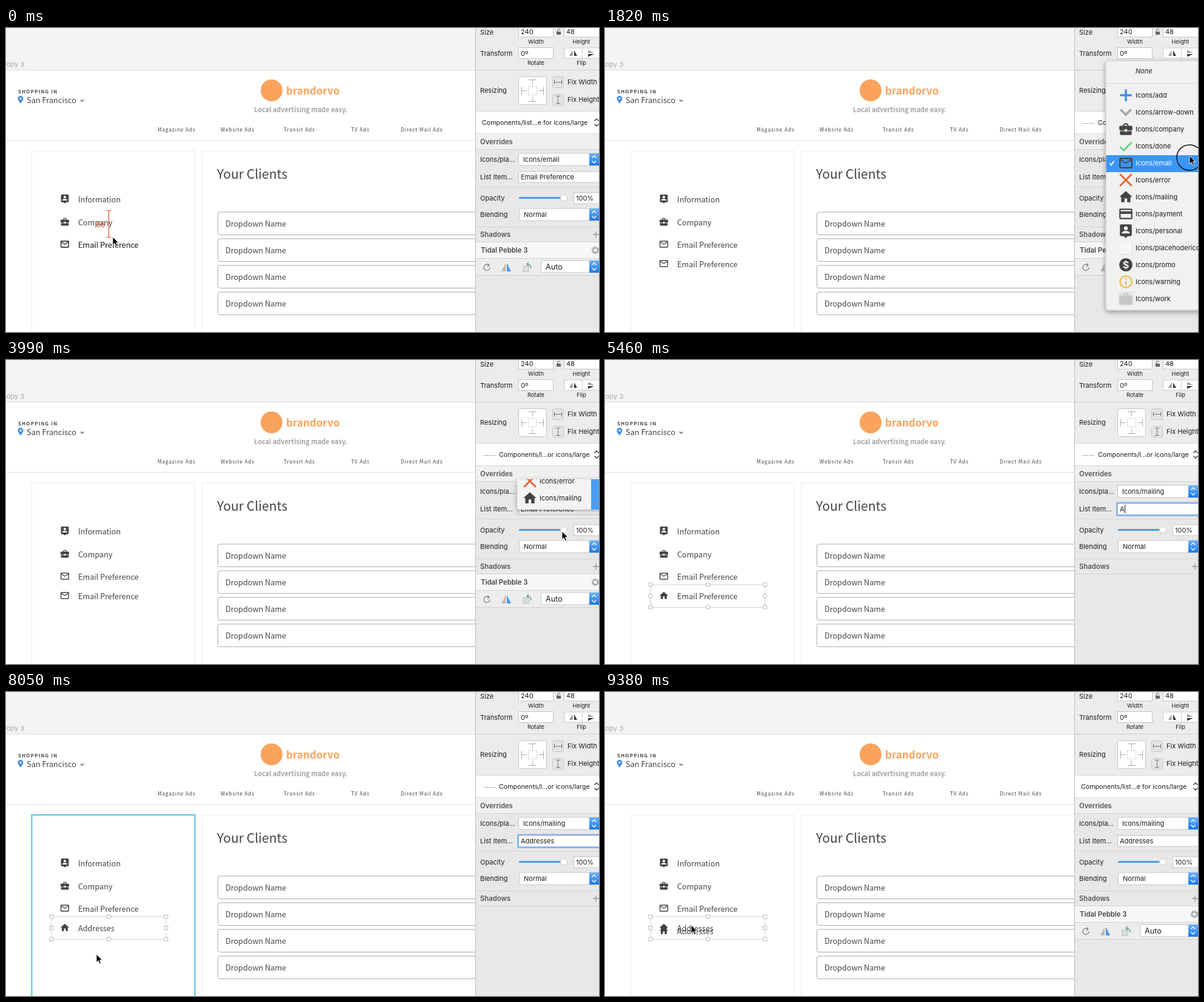
These frames come from a looping animation (978x502 px, 9450 ms). An HTML page:

```html
<!DOCTYPE html>
<html lang="en">
<head>
<meta charset="utf-8">
<title>Swapping a list icon</title>
<style>
html, body { margin: 0; width: 100%; height: 100%; overflow: hidden; background: #fff }
svg { display: block; width: 978px; height: 502px }
text { font-family: Inter, Roboto, sans-serif; font-size: 11px; fill: #1c1c1c; white-space: pre }
.web text, .web { font-family: 'Noto Sans CJK JP', 'Noto Sans CJK SC', 'Noto Sans CJK', 'Noto Sans', sans-serif; font-size: 12.65px; fill: #444 }
.web .nav { font-size: 8.3px; font-weight: 500; letter-spacing: .85px }
.head { font-weight: 600; fill: #555; font-size: 11.3px }
.small { font-size: 9.3px; text-anchor: middle }
</style>
</head>
<body>
<svg id="stage" viewBox="0 0 978 502"></svg>
<script>
const LOOP = 9450, STEP = 70, INK = '#444';
const $ = id => document.getElementById(id);
const text = (x, y, s, attrs = '') => `<text x="${x}" y="${y}" ${attrs}>${s}</text>`;
const rect = (x, y, w, h, fill, attrs = '') =>
  `<rect x="${x}" y="${y}" width="${w}" height="${h}" fill="${fill}" ${attrs}/>`;
const line = (d, color, w = 1, attrs = '') =>
  `<path d="${d}" fill="none" stroke="${color}" stroke-width="${w}" ${attrs}/>`;
const solid = (d, color = INK) => `<path d="${d}" fill="${color}" fill-rule="evenodd"/>`;

// Icons on a 24 unit grid
const card = 'M20 4H4a2 2 0 0 0-2 2v12a2 2 0 0 0 2 2h16a2 2 0 0 0 2-2V6a2 2 0 0 0-2-2z';
const bag = 'M20 7h-4V5l-2-2h-4L8 5v2H4a2 2 0 0 0-2 2v3a2 2 0 0 0 2 2h6v-2h4v2h6a2 2 0 0 0 2-2V9a2 2 0 0 0-2-2zM14 7h-4V5h4z';
const icons = {
  add: line('M12 3V21M3 12H21', '#3f8ee8', 3.2),
  'arrow-down': line('M4 8L12 16L20 8', '#a9a9a9', 3.6),
  company: solid(bag + 'M10 16v-1H3v4a2 2 0 0 0 2 2h14a2 2 0 0 0 2-2v-4h-7v1z'),
  done: line('M3 13L9 18.5L21 6', '#6dcf8d', 2.8),
  email: solid(card + 'M20 18H4V8l8 5 8-5zM12 11L4 6h16z'),
  error: line('M3 3L21 21M21 3L3 21', '#e2673a', 2.8),
  mailing: solid('M10 20v-6h4v6h5v-8h3L12 3 2 12h3v8z'),
  payment: solid(card + 'M20 18H4v-6h16zM20 8H4V6h16z'),
  personal: solid('M19 2H5a2 2 0 0 0-2 2v14a2 2 0 0 0 2 2h4l3 3 3-3h4a2 2 0 0 0 2-2V4a2 2 0 0 0-2-2zM12 5a3 3 0 1 1 0 6 3 3 0 0 1 0-6zM18 16H6v-1c0-2 4-3 6-3s6 1 6 3z'),
  placehodericon: rect(2, 2, 20, 20, '#f6f6f6') + line('M22 2V22H2', '#ddd'),
  promo: `<circle cx="12" cy="12" r="10" fill="${INK}"/>` +
    text(12, 17.5, '$', 'text-anchor="middle" style="font-size:15px;font-weight:600;fill:#fff"'),
  warning: `<circle cx="12" cy="12" r="8.8" fill="none" stroke="#e9c14f" stroke-width="2.2"/>` +
    line('M12 6.5V9M12 11V17', '#e9c14f', 2.2),
  work: rect(1, 1, 22, 22, '#e6e6e6') + solid('M20 7h-4V5l-2-2h-4L8 5v2H4a2 2 0 0 0-2 2v10a2 2 0 0 0 2 2h16a2 2 0 0 0 2-2V9a2 2 0 0 0-2-2zM14 7h-4V5h4z', '#c8c8c8')
};
const names = Object.keys(icons);
const icon = (name, cx, cy, size) =>
  `<g transform="translate(${cx - size / 2} ${cy - size / 2}) scale(${size / 24})">${icons[name]}</g>`;
const item = (name, label, y) => icon(name, 97, y - 1, 17) + text(119, y + 4.5, label);

const chevrons = (x, y, color) =>
  line(`M${x - 3.5} ${y - 2.5}l3.5 -3.5l3.5 3.5M${x - 3.5} ${y + 2.5}l3.5 3.5l3.5 -3.5`, color, 1.4);
const select = (x, y, label, id, size = 11) =>
  rect(x, y - 10, 140, 20, '#fff', 'rx="3" stroke="#c6c6c6"') +
  rect(962, y - 10, 20, 20, 'url(#blue)') + chevrons(970, y, '#fff') +
  text(x + 7.5, y + size * .36, label, `id="${id}" style="font-size:${size}px"`);
const field = (x, y, w, label) =>
  rect(x, y - 9, w, 18, '#fff', 'stroke="#c4c4c4"') + text(x + 3.5, y + 4, label);

const page = () => {
  const nav = [[250, 'Magazine Ads'], [354, 'Website Ads'], [458, 'Transit Ads'], [569, 'TV Ads'], [651, 'Direct Mail Ads']];
  const drops = [304, 348, 392, 436];
  return rect(0, 0, 978, 502, '#fff') + rect(0, 0, 978, 69.5, '#f4f4f4') +
    line('M0 69.5H775', '#dcdcdc') + line('M0 185.5H775', '#e2e2e2') +
    text(1, 63.5, 'opy 3', 'style="fill:#aaa"') +
    '<circle cx="438" cy="103" r="18" fill="#f9a35c"/><g class="web">' +
    text(462, 109.5, 'brandorvo', 'style="font-size:17px;font-weight:700;fill:#f9a35c"') +
    text(409, 138.5, 'Local advertising made easy.', 'style="font-size:10.900px;font-weight:700;fill:#a3a3a3"') +
    text(20, 107.5, 'SHOPPING IN', 'style="font-size:8px;font-weight:700;letter-spacing:1.15px"') +
    solid('M24 125C21 120 19.500 118.500 19.500 116.500a4.500 4.500 0 0 1 9 0C28.500 118.500 27 120 24 125zM24 114.800a1.700 1.700 0 1 0 .01 0z', '#3f8ee8') +
    text(34, 124, 'San Francisco', 'style="font-size:12.8px"') + line('M123 118.500l2.700 2.700l2.700 -2.700', '#555', 1.2) +
    nav.map(([x, s]) => text(x, 171, s, 'class="nav"')).join('') +
    rect(42.5, 203, 269, 320, 'none', 'stroke="#ececec"') + rect(323.5, 203, 500, 320, 'none', 'stroke="#ececec"') +
    text(348, 249, 'Your Clients', 'style="font-size:21.100px"') +
    drops.map(y => rect(349.5, y, 440, 37.5, '#fff', 'rx="3" stroke="#aaa"') + text(362, y + 23.5, 'Dropdown Name')).join('') +
    item('personal', 'Information', 283) + item('company', 'Company', 321) + item('email', 'Email Preference', 358) +
    `<g id="copy"><g id="mail">${icon('email', 97, 357, 17)}</g><g id="home">${icon('mailing', 97, 357, 17)}</g>` +
    text(119, 362.5, '', 'id="copyText"') + '</g>' +
    `<g id="next">${item('mailing', 'Addresses', 390)}</g></g>` +
    `<g id="hover">${rect(42.5, 203, 269, 320, 'none', 'stroke="#4fc3e0" stroke-width="2"')}</g>` +
    '<g id="box">' + rect(75.5, 371, 188.5, 37.5, 'none', 'stroke="#d4d4d4"') +
    [371, 389.5, 408].flatMap(y => [75, 169.5, 264].map(x => x === 169.5 && y === 389.5 ? '' :
      rect(x - 3, y - 3, 6, 6, '#fff', 'stroke="#b5b5b5" rx="1"'))).join('') + '</g>' +
    '<g id="gap">' + line('M169.500 301.500V345.500M165.500 301.500H173.500M165.500 345.500H173.500', '#d2512f', 1.2) +
    text(149, 328.5, '56', 'style="font-size:12px;fill:#d2512f"') + '</g>';
};

const inspector = () =>
  rect(775, 0, 203, 502, '#e8e8e8') + rect(775, 0, 203, 138, '#ececec') + line('M775 69.500H978', '#d2d2d2') +
  rect(775, 138, 203, 36, '#fff') + rect(775, 175, 203, 25, '#f0f0f0') +
  line('M775 137.500H978M775 174.500H978M775 200.500H978M775 262.500H978M775 328.500H978M775 353.500H978', '#d6d6d6') +
  text(782, 11, 'Size') + field(845.5, 6, 57, '240') + field(920.5, 6, 70, '48') +
  rect(908, 6, 7, 5, '#666') + line('M909.500 6V4a2 2 0 0 1 4 0', '#666') +
  text(874, 26, 'Width', 'class="small"') + text(949, 26, 'Height', 'class="small"') +
  text(782, 46, 'Transform') + field(845.5, 41.5, 57, '0º') +
  rect(920.5, 33, 70, 17, '#fff', 'rx="3" stroke="#c8c8c8"') + line('M950.500 33V50', '#d0d0d0') +
  solid('M934.500 37V46H929zM960 41L970 41L960 36.500z', '#999') + solid('M937 37V46H942zM960 43H970L960 47.500z', '#333') +
  text(874, 61, 'Rotate', 'class="small"') + text(949, 61, 'Flip', 'class="small"') +
  text(782, 107, 'Resizing') + rect(845.5, 80.5, 46, 46, '#fff', 'rx="3" stroke="#c4c4c4"') +
  rect(861.5, 96.5, 14, 14, '#fff', 'stroke="#ccc" stroke-dasharray="2 1"') +
  line('M862 85.500h13M868.500 86v7M862 121.500h13M868.500 114v7M850.500 97v13M851 103.500h7M886.500 97v13M879 103.500h7', '#aaa') +
  [80.5, 109.5].map(y => rect(901.5, y, 18, 18, '#e4e4e4', 'rx="2" stroke="#c8c8c8"')).join('') +
  line('M904.500 86v7M916.500 86v7M905 89.500h11M907 112.500h7M907 124.500h7M910.500 113v11', '#777') +
  text(926, 93, 'Fix Width') + text(926, 122, 'Fix Height') +
  `<g id="thumb">${line('M787 157.500h20', '#aaa', 1.2, 'stroke-dasharray="3 1 6 1"')}</g>` +
  text(785, 160, '', 'id="symbol" style="font-size:10.700px"') + chevrons(974, 156, '#333') +
  text(782, 192, 'Overrides', 'class="head"') +
  text(782, 221, 'Icons/pla...') + select(845.5, 217, '', 'chosen') +
  text(782, 250, 'List Item...') + rect(845.5, 237, 140, 18, '#fff', 'stroke="#c4c4c4"') +
  rect(844.5, 236, 142, 20.5, '#fff', 'id="focus" rx="1.500" stroke="#8ab6ec" stroke-width="3"') +
  rect(849, 239, 89, 14, '#b4d5fe', 'id="mark"') + text(849, 250, '', 'id="typed"') + rect(0, 239, 1, 14, '#111', 'id="caret"') +
  text(782, 285, 'Opacity') + line('M847.500 280.500H916', '#4a9be8', 3, 'stroke-linecap="round"') +
  '<circle cx="920" cy="280.500" r="5.500" fill="#fff" stroke="#c6c6c6"/>' + field(936.5, 281, 60, '100%') +
  text(782, 312, 'Blending') + select(846.5, 308, 'Normal', 'blend') +
  text(782, 345, 'Shadows', 'class="head"') + line('M968 341H978M973 336V346', '#999', 1.4) +
  '<g id="plugin">' + rect(775, 354, 203, 26, '#f7f7f7') + rect(775, 381, 203, 27, '#ededed') + line('M775 380.500H978M775 408.500H978', '#d2d2d2') +
  text(783, 371, 'Tidal Pebble 3', 'class="head" style="fill:#444"') +
  '<circle cx="972" cy="367" r="4" fill="none" stroke="#aaa" stroke-width="2.500"/><circle cx="972" cy="367" r="5.800" fill="none" stroke="#aaa" stroke-width="1.500" stroke-dasharray="2 2.550"/>' +
  line('M796 391.500a5 5 0 1 0 2 4M794 389l3 2.500l-3 2.500', '#777', 1.2) +
  solid('M824 388V402H817z', '#bbb') + solid('M826 388V402H833z', '#4a9be8') +
  rect(853, 393, 9, 9, '#ddd', 'stroke="#bbb"') + line('M866 397C866 391 863 390 859 390M862 387l-3 3l3 3', '#5f9f80', 1.4) +
  select(882.5, 394, 'Auto', 'auto', 12.6) + '</g>' + line('M774.500 0V502', '#bcbcbc');

const rows = (dx, dy, id) => names.map((name, i) => {
  const y = 111 + 28 * i + dy;
  return icon(name, 859 + dx, y, 26) + text(875 + dx, y + 4, 'Icons/' + name, id ? `id="${id + i}"` : '');
}).join('');

const menu = () =>
  '<g id="menu">' + rect(826, 54, 170, 412, '#f1f1f1', 'rx="5" stroke="#c8c8c8" filter="url(#shade)"') +
  text(875, 75, 'None', 'font-style="italic"') + line('M826 91.500H978', '#dadada') +
  rect(826.5, 0, 152, 28, '#3b96f7', 'id="bar"') + rows(0, 0, 'row') +
  line('M832.500 223l2.500 3.500l4.500 -7', '#222', 1.8, 'id="tick"') + '</g>' +
  '<g id="shrunk">' + rect(843, 197, 160, 50, '#f3f3f3', 'rx="4" filter="url(#shade)"') +
  `<g clip-path="url(#slot)">${rows(5, -51)}${rect(965, 190, 14, 60, '#4b9cf5')}</g></g>`;

$('stage').innerHTML = `<defs>
  <linearGradient id="blue" x2="0" y2="1"><stop stop-color="#6cb5fb"/><stop offset="1" stop-color="#1778f2"/></linearGradient>
  <filter id="shade" x="-20%" y="-20%" width="140%" height="140%"><feDropShadow dx="0" dy="3" stdDeviation="4" flood-opacity=".35"/></filter>
  <clipPath id="slot"><rect x="843" y="197" width="160" height="50" rx="4"/></clipPath></defs>` +
  page() + inspector() + menu() +
  '<circle id="ring" cx="964" cy="214" r="21" fill="none" stroke="#111" stroke-width="1.500"/>' +
  '<path id="cursor" d="M0 0V13.500L3.200 10.600L5.400 15.600L7.700 14.600L5.500 9.700H9.800z" fill="#000" stroke="#fff" stroke-width=".9"/>';

// Pointer path: time, x, y
const path = [[0, 176, 345], [490, 176, 377], [630, 176, 377], [1400, 964, 211], [2030, 964, 211], [2660, 918, 278],
  [3640, 918, 278], [3920, 917, 283], [4060, 917, 283], [4550, 862, 240], [7070, 862, 240], [7840, 149, 433],
  [8120, 149, 433], [8680, 142, 380], [9100, 142, 380], [9380, 142, 385]];
const ease = p => p * p * (3 - 2 * p);
function pointer(t) {
  const i = path.findIndex(k => k[0] > t);
  if (i < 0) return path.at(-1).slice(1);
  const [a, b] = [path[i - 1], path[i]], p = ease((t - a[0]) / (b[0] - a[0]));
  return [a[1] + (b[1] - a[1]) * p, a[2] + (b[2] - a[2]) * p];
}
const keys = [5390, 5530, 5670, 5810, 5950, 6090, 6300, 6440, 6580];
const show = (id, on) => $(id).style.display = on ? '' : 'none';
const move = (id, x, y) => $(id).setAttribute('transform', `translate(${x} ${y})`);
const within = (t, a, b) => t >= a && t < b;

function draw(t) {
  const [x, y] = pointer(t);
  const swapped = t >= 4060, focused = within(t, 4620, 8750), open = within(t, 1680, 3850);
  move('cursor', x, y);
  show('cursor', !within(t, 4690, 7070));
  show('gap', t < 140);

  move('copy', 0, t < 490 ? y - 345 : 32);
  show('mail', !swapped);
  show('home', swapped);
  $('copyText').textContent = t < 6930 ? 'Email Preference' : 'Addresses';
  show('next', t >= 9100);
  move('next', 0, y - 380);
  show('box', swapped);
  show('hover', t > 7070 && within(x, 42, 312) && y > 409);

  const dragged = within(t, 560, 8750);
  show('thumb', dragged);
  $('symbol').textContent = dragged ? 'Components/l...or icons/large' : 'Components/list...e for icons/large';
  $('symbol').setAttribute('x', dragged ? 813 : 785);
  $('chosen').textContent = swapped ? 'Icons/mailing' : 'Icons/email';
  show('plugin', !within(t, 4060, 8750));

  const count = keys.filter(k => k <= t).length;
  $('typed').textContent = count ? 'Addresses'.slice(0, count) : 'Email Preference';
  show('focus', focused);
  show('mark', focused && !count);
  show('caret', focused && count && t < 6930);
  $('caret').setAttribute('x', 849.5 + $('typed').getComputedTextLength());

  show('menu', open);
  show('shrunk', within(t, 3850, 4060));
  const hot = Math.max(0, Math.min(12, Math.floor((y - 98) / 28)));
  $('bar').setAttribute('y', 98 + 28 * hot);
  names.forEach((n, i) => $('row' + i).style.fill = i === hot ? '#fff' : '');
  $('tick').setAttribute('stroke', hot === 4 ? '#fff' : '#222');
  show('ring', within(t, 1610, 1960));
}

const start = performance.now();
function tick() {
  const t = (performance.now() - start) % LOOP;
  draw(Math.floor(t / STEP) * STEP);
  requestAnimationFrame(tick);
}
tick();
</script>
</body>
</html>
```
